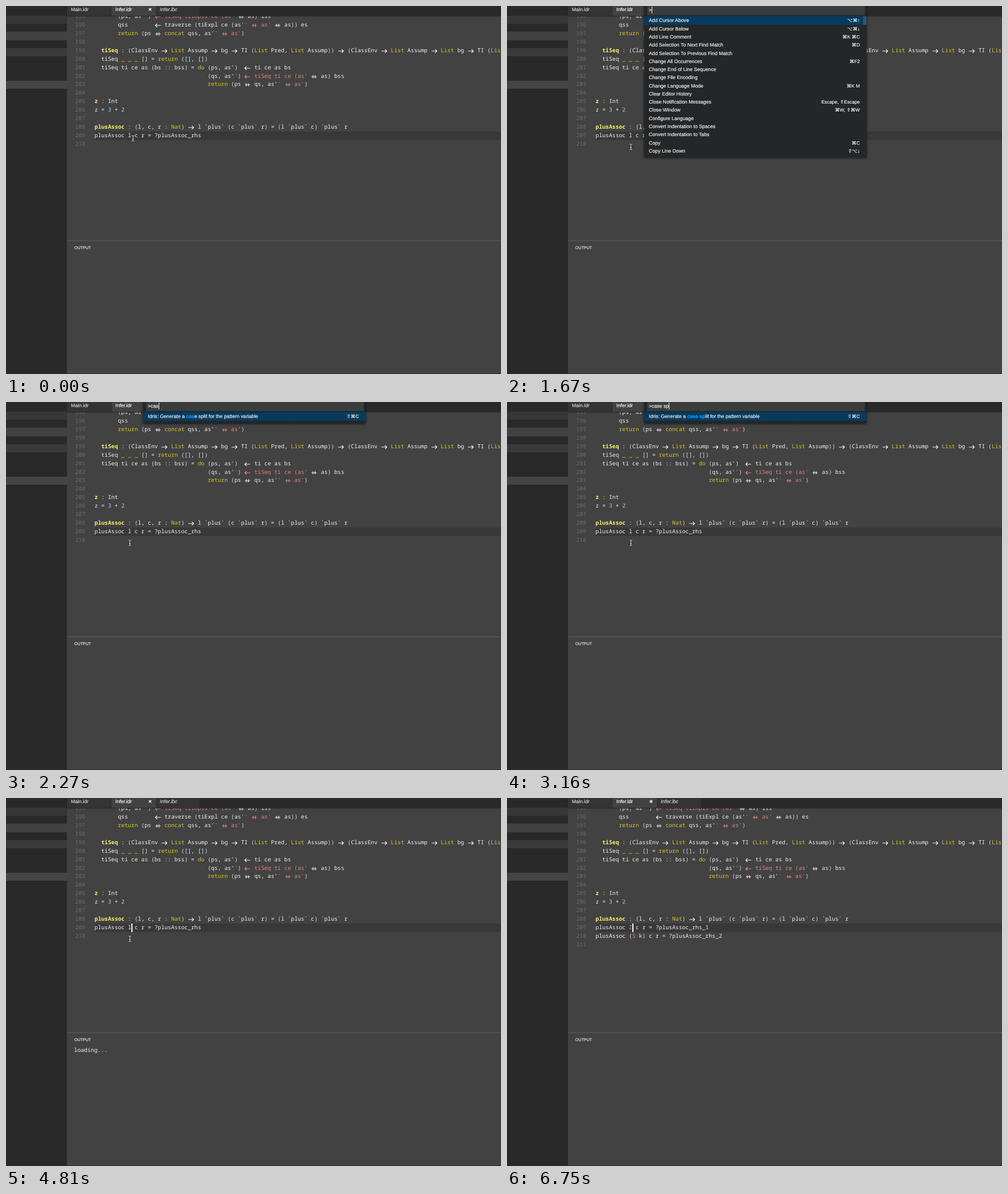
Write an HTML page that moves like this. It is 869 by 645 pixels and loops after 7070 ms.

```html
<!DOCTYPE html>
<html lang="en">
<head>
<meta charset="utf-8">
<title>Case split in the editor</title>
<style>
  html, body { margin: 0; width: 100%; height: 100%; overflow: hidden; background: #424242; }
  #stage { position: relative; width: 869px; height: 645px; overflow: hidden; background: #424242;
    color: #f2f2f2; font: 8.7px/14px "Liberation Sans", Arial, sans-serif; text-rendering: geometricPrecision; }
  #stage div, #mouse { position: absolute; white-space: pre; }
  .ui { -webkit-text-stroke: .2px currentColor; }
  .mono { font: 500 9.74px/14.94px "Noto Sans Mono", "DejaVu Sans Mono", monospace; }
  .line { left: 155.6px; height: 14.94px; }
  .num { left: 121.6px; color: #6b6b6b; font-weight: 400; }
  .lig { width: 11.69px; height: 14.94px; vertical-align: top; fill: none; stroke: currentColor; stroke-width: 1.1; }
  .y { color: #f8f06a; font-weight: 700; }
  .k { color: #dcc52a; }
  .r { color: #ee8080; }
  .n { color: #8fdcec; }
  .q { color: #8d9cab; }
  .b { color: #d3e2ee; }
  #side { width: 107px; height: 645px; background: #292929; }
  #tabs { left: 107px; width: 762px; height: 17px; background: #292929; box-shadow: 0 1px 2px #222; }
  .tab { top: 0; height: 17px; background: #343434; color: #d2d2d2; }
  .tab span { position: absolute; left: 7px; top: -1px; }
  #caret { left: 220.2px; top: 219.5px; width: 1.4px; height: 15px; background: #fff; }
  #box { left: 241px; top: -6px; width: 390px; background: #252627; box-shadow: 0 1px 4px #111; overflow: hidden; }
  #input { left: 5px; top: 4px; width: 380px; height: 16px; border: 1px solid #17455f; background: #3c3c3c; line-height: 17px; }
  #input span { position: relative; left: 2px; border-right: 1px solid #eee; padding: 1px 0; }
  .row { left: 0; width: 390px; height: 14.3px; line-height: 14.8px; }
  .row.on { background: #073b5e; }
  .row span { position: absolute; left: 8px; }
  .row i { position: absolute; right: 11.5px; font: 8.4px/14.8px "Liberation Sans", "DejaVu Sans", sans-serif; }
  .row b { color: #0a9bfa; }
  #thumb { left: 384px; top: 24.4px; width: 6px; height: 14.3px; background: #2d5672; }
</style>
</head>
<body>
<div id="stage"></div>
<script>
const LOOP = 7070, ROW = 14.94;
const stage = document.getElementById('stage');

function add(parent, cls, html = '', css = {}, id = '') {
  const el = document.createElement('div');
  el.className = cls;
  el.innerHTML = html;
  if (id) el.id = id;
  Object.assign(el.style, css);
  parent.append(el);
  return el;
}
const px = v => v + 'px';
const lineTop = n => px(220.1 + (n - 209) * ROW);

// Two-cell ligatures drawn as strokes
const ligs = {
  '->': 'M1 8H10.5M7.4 5L10.5 8L7.4 11',
  '<-': 'M10.7 8H1.2M4.3 5L1.2 8L4.3 11',
  '++': 'M1.3 8H10.4M3.9 5.2V10.8M7.8 5.2V10.8'
};
const paint = s => s.replace(/->|<-|\+\+|[()[\]]/g, m => ligs[m]
  ? `<svg class="lig" viewBox="0 0 11.69 14.94"><path d="${ligs[m]}"/></svg>`
  : `<span class="b">${m}</span>`);
// {c text} colours text with class c
const code = s => s.split(/(\{\w [^}]*\})/).map(p => {
  const m = /^\{(\w) (.*)\}$/.exec(p);
  if (!m) return paint(p);
  const body = m[1] === 'r' ? paint(m[2]).replace(/ class="b"/g, '') : paint(m[2]);
  return `<span class="${m[1]}">${body}</span>`;
}).join('');

const Q = "{q '}", L = '{k List}', pad = n => ' '.repeat(n);
const text = [
  pad(7) + `(ps, as'${Q}) {r <- tiSeq tiImpls ce (as}${Q} ++ as) iss`,
  pad(7) + `qss        <- traverse (tiExpl ce (as'${Q}{r  ++ as'} ++ as)) es`,
  pad(7) + `{k return} (ps ++ {k concat} qss, as'${Q}{r  ++ as'})`,
  '',
  `  {y tiSeq} : (ClassEnv -> ${L} Assump -> bg -> TI (${L} Pred, ${L} Assump)) -> (ClassEnv -> ${L} Assump -> ${L} bg -> TI (${L} Pred`,
  '  tiSeq {k _ _ _} [] = {k return} ([], [])',
  "  tiSeq ti ce as (bs :: bss) = {k do} (ps, as')  <- ti ce as bs",
  pad(34) + `(qs, as'${Q}) {r <- tiSeq ti ce (as}${Q} ++ as) bss`,
  pad(34) + `{k return} (ps ++ qs, as'${Q}{r  ++ as'})`,
  '',
  '{y z} : Int',
  'z = {n 3} + {n 2}',
  '',
  '{y plusAssoc} : (l, c, r : {k Nat}) -> l `plus` (c `plus` r) = (l `plus` c) `plus` r'
];

// Editor
add(stage, '', '', { left: '156px', top: '219.5px', width: '713px', height: '15px', background: '#383838' });
text.forEach((s, i) => add(stage, 'mono line', code(s), { top: lineTop(195 + i) }));
for (let n = 195; n <= 210; n++) add(stage, 'mono num', n, { top: lineTop(n) });
const group = () => add(stage, '', '', { left: 0, top: 0 });
const before = group(), after = group();
add(before, 'mono line', code('plusAssoc l c r = ?plusAssoc_rhs'), { top: lineTop(209) });
add(after, 'mono line', code('plusAssoc {r Z} c r = ?plusAssoc_rhs_1'), { top: lineTop(209) });
add(after, 'mono line', code('plusAssoc ({r S} k) c r = ?plusAssoc_rhs_2'), { top: lineTop(210) });
add(after, 'mono num', '211', { top: lineTop(211) });
const caret = add(stage, '', '', {}, 'caret');

// Sidebar, tabs and output panel
const side = add(stage, '', '', {}, 'side');
[[17, '#363636'], [45.3, '#414141'], [74, '#3a3a3a'], [131, '#444']].forEach(([y, c]) =>
  add(side, '', '', { top: px(y), width: '107px', height: '14.3px', background: c }));
const tabs = add(stage, 'ui', '', {}, 'tabs');
const tab = (x, w, name, css) => add(tabs, 'tab', `<span>${name}</span>`, { left: px(x), width: px(w), ...css });
tab(0, 77, 'Main.idr');
const active = tab(78, 77.5, 'Infer.idr', { background: '#424242', color: '#fff' });
tab(156, 77, 'Infer.ibc', { fontStyle: 'italic' });
const mark = d => `<svg style="position:absolute;left:64px;top:2px" width="8" height="8" viewBox="-4 -4 8 8">${d}</svg>`;
const cross = add(active, '', mark('<path d="M-2-2L2 2M2-2L-2 2" stroke="#fff" stroke-width="1.4"/>'), { left: 0, top: 0 });
const dot = add(active, '', mark('<circle r="2.7" fill="#c6c6c6"/>'), { left: 0, top: 0 });
add(stage, '', '', { left: '107px', top: '411px', width: '762px', height: '1px', background: '#5c5c5c' });
add(stage, '', '', { left: '107px', top: '644px', width: '762px', height: '1px', background: '#2c2c2c' });
add(stage, 'ui', 'OUTPUT', { left: '120px', top: '417px', fontSize: '7.1px', color: '#e2e2e2' });
const loading = add(stage, 'mono', 'loading...', { left: '119.6px', top: '435.4px' });

// Command palette: label | shortcut, matches in square brackets
const all = `Add Cursor Above|⌥⌘↑
Add Cursor Below|⌥⌘↓
Add Line Comment|⌘K ⌘C
Add Selection To Next Find Match|⌘D
Add Selection To Previous Find Match
Change All Occurrences|⌘F2
Change End of Line Sequence
Change File Encoding
Change Language Mode|⌘K M
Clear Editor History
Close Notification Messages|Escape, ⇧Escape
Close Window|⌘W, ⇧⌘W
Configure Language
Convert Indentation to Spaces
Convert Indentation to Tabs
Copy|⌘C
Copy Line Down|⇧⌥↓`.split('\n');
const matchCa = `Add [C]ursor [A]bove|⌥⌘↑
[C]hange [A]ll Occurrences|⌘F2
Close Notifi[ca]tion Messages|Escape, ⇧Escape
Files: [C]ompare [A]ctive File With...
Files: [C]opy Path of [A]ctive File|⌘K P
Idris: Generate a [ca]se split for the pattern variable|⇧⌘C
Idris: List the [c]urrently [a]ctive holes|⇧⌘H
Move [Ca]rret Left
Move [Ca]rret Right
View: [C]lose [A]ll Editors|⌘K ⌘W
View: [C]lose [A]ll Editors in Group|⌘K W`.split('\n');
const split = 'Idris: Generate a case split for the pattern variable|⇧⌘C';

function find(query) {
  if (!query) return all;
  if (query === 'c') return all.map(s => s.replace(/\bC|c/, '[$&]'));
  if (query === 'ca') return matchCa;
  return [split.replace(query, '[$&]')];
}
const box = add(stage, 'ui', '', {}, 'box');
let shown;
function palette(query) {
  if (query === shown) return;
  shown = query;
  box.hidden = query === null;
  if (box.hidden) return;
  const rows = find(query);
  box.replaceChildren();
  box.style.height = px(28.4 + rows.length * 14.28);
  add(box, '', `<span>&gt;${query}</span>`, {}, 'input');
  rows.forEach((s, i) => {
    const [label, keys = ''] = s.replace(/\[/g, '<b>').replace(/\]/g, '</b>').split('|');
    add(box, i ? 'row' : 'row on', `<span>${label}</span><i>${keys}</i>`, { top: px(24.4 + i * 14.28) });
  });
  if (rows.length > 16) add(box, '', '', {}, 'thumb');
}

// Mouse pointer: a light I-beam with a dark rim
const beam = 'M-2.3-5Q0-5 0-3.6Q0-5 2.3-5M0-3.6V3.6M-2.3 5Q0 5 0 3.6Q0 5 2.3 5M-1.2 1.5H1.2';
stage.insertAdjacentHTML('beforeend', `<svg id="mouse" width="9" height="15" viewBox="-4.5 -7.5 9 15" fill="none"
  style="left:0;top:0"><path d="${beam}" stroke="#222" stroke-width="2.2"/><path d="${beam}" stroke="#eee"/></svg>`);
const mouse = document.getElementById('mouse');

// Step tables: [start time, value]
const queries = [[0, null], [1670, ''], [1970, 'c'], [2120, 'ca'], [2270, 'cas'], [2570, 'case'],
  [2720, 'case '], [2870, 'case s'], [3160, 'case sp'], [3310, 'case spl'], [3460, 'case split'], [3610, null]];
const blink = [[0, 0], [470, 1], [920, 0], [1370, 1], [1670, 0], [3760, 1], [4360, 0], [4810, 1], [5400, 0],
  [5850, 1], [6300, 0], [6750, 1]];
const moves = [[0, [223, 232]], [150, [222, 235]], [300, [220, 240]], [470, [218, 244]], [620, [217, 246]], [770, [217.5, 247]],
  [4960, [222, 250]], [5110, [250, 271]], [5260, [330, 330]], [5400, [460, 425]], [5550, [643, 559]], [5700, null]];
const at = (steps, t) => steps.findLast(s => s[0] <= t)[1];

function render(t) {
  const done = t >= 5260, p = at(moves, t);
  palette(at(queries, t));
  caret.hidden = !at(blink, t);
  before.hidden = cross.hidden = done;
  after.hidden = dot.hidden = !done;
  loading.hidden = t < 4210 || done;
  mouse.style.display = p ? '' : 'none';
  if (p) mouse.style.transform = `translate(${p[0] - 4.5}px, ${p[1] - 7.5}px)`;
}
const start = performance.now();
function tick() {
  render((performance.now() - start) % LOOP);
  requestAnimationFrame(tick);
}
render(0);
requestAnimationFrame(tick);
</script>
</body>
</html>
```
